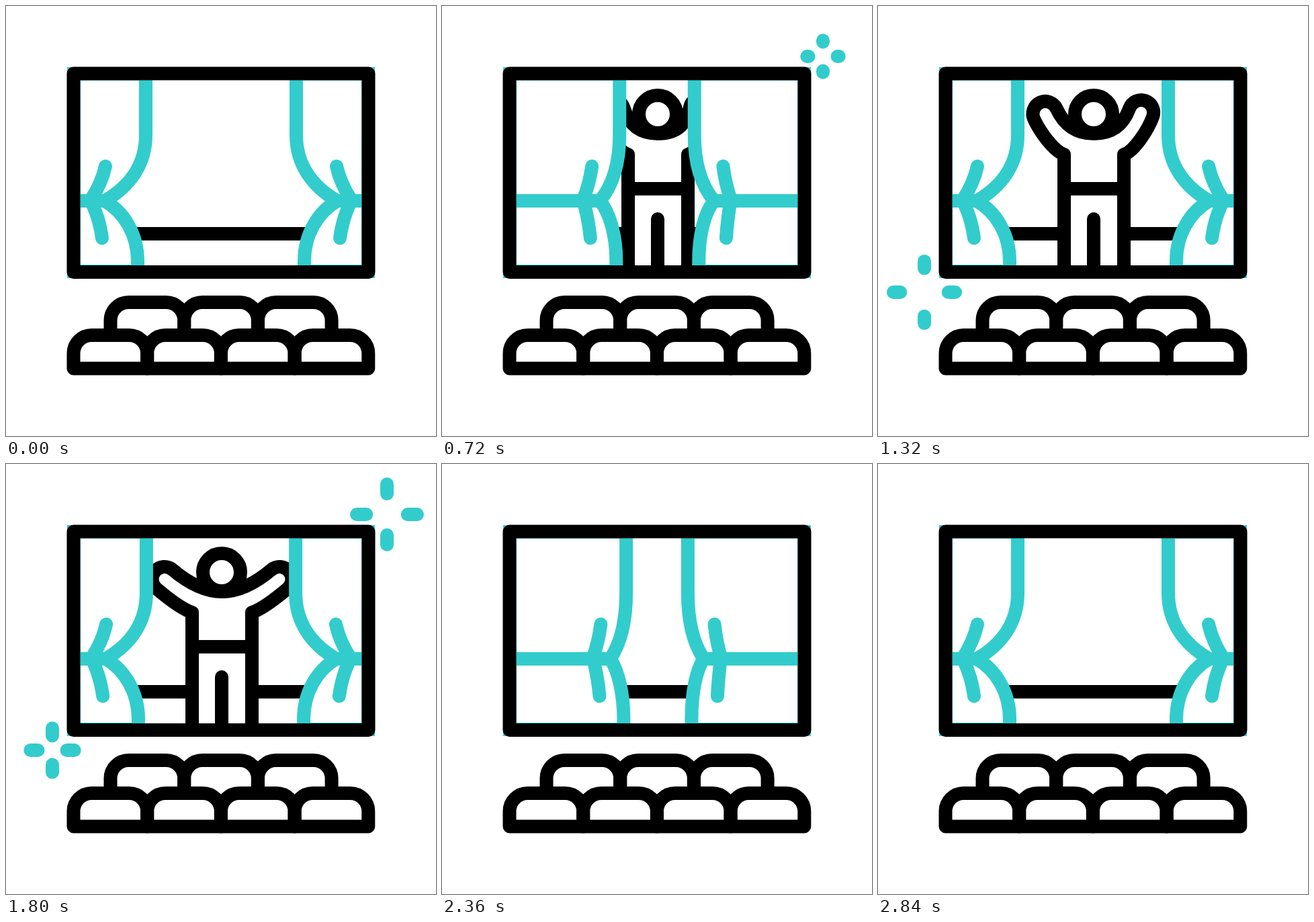
Recreate the animation shown at these times as an HTML page with a canvas. Size 640 px wide and 640 px high, loop 3 s.

```html
<!DOCTYPE html>
<html lang="en">
<head>
<meta charset="utf-8">
<title>Theatre</title>
<style>
  html, body { margin: 0; width: 100%; height: 100%; overflow: hidden; background: #fff; }
  canvas { display: block; }
</style>
</head>
<body>
<canvas id="stage" width="640" height="640"></canvas>
<script>
const ctx = document.getElementById('stage').getContext('2d');
const BLACK = '#000', TEAL = '#33cccc', WHITE = '#fff';
const LOOP = 3000, STEP = 40, LAST = 2840;

const clamp = u => Math.min(1, Math.max(0, u));
const progress = (t, from, to) => clamp((t - from) / (to - from));
const smooth = u => u * u * (3 - 2 * u);
const mix = (a, b, u) => a + (b - a) * u;

function draw(path, color, { fill, cap = 'butt', join = 'round' } = {}) {
  const shape = new Path2D(path);
  if (fill) {
    ctx.fillStyle = fill;
    ctx.fill(shape);
  }
  ctx.lineWidth = 20;
  ctx.lineCap = cap;
  ctx.lineJoin = join;
  ctx.strokeStyle = color;
  ctx.stroke(shape);
}

function mirrored(axis, paint) {
  ctx.save();
  ctx.translate(2 * axis, 0);
  ctx.scale(-1, 1);
  paint();
  ctx.restore();
}

// 0 = curtains drawn aside, 1 = closed
function closedAmount(t) {
  const opening = start => 1 - smooth(progress(t, start, start + 620) ** 0.75);
  if (t < 490) return smooth(progress(t, 20, 440));
  if (t < 1780) return opening(490);
  if (t < 2170) return smooth(progress(t, 1780, 2150));
  return opening(2170);
}

function curtain(p, hemShift, tieTopShift, tieLowShift) {
  const top = 208 + 104.8 * p, knot = 147 + 164 * p, hem = 196 + hemShift * p;
  const tie = 126 + 156 * p, tieTop = 148 + tieTopShift * p, tieLow = 143 + tieLowShift * p;
  draw(`M101 101 H${top} V192
        C${top} 236 ${184 + 128 * p} 268.6 ${knot} 290
        C${176 + 136 * p} 307 ${hem} 340 ${hem} 380 V395 H101 Z`,
       TEAL, { fill: WHITE, join: 'miter' });
  draw(`M101 290 H${knot}`, TEAL);
  const bend = (end, k) => mix(end, tie, k);
  draw(`M${tieTop} 238.5 C${bend(tieTop, .2)} 258 ${bend(tieTop, .55)} 274 ${tie} 289
        M${tieLow} 345.5 C${bend(tieLow, .2)} 322 ${bend(tieLow, .5)} 308 ${tie + 1} 291`,
       TEAL, { cap: 'round' });
}

function arm(raise) {
  const x = mix(236, 253, raise), y = mix(171.5, 157, raise);
  const angle = mix(40, 73, raise) * Math.PI / 180;
  const dx = Math.cos(angle), dy = Math.sin(angle), r = 18.5;
  const outer = [x - r * dy, y + r * dx], inner = [x + r * dy, y - r * dx];
  const along = ([px, py], k) => `${px + k * dx} ${py + k * dy}`;
  draw(`M277 272 V221 C262 216 ${along(outer, 22)} ${along(outer, 0)}
        A${r} ${r} 0 0 1 ${along(inner, 0)}
        C${along(inner, 26)} 293 190 321.5 190`, BLACK);
}

function performer(t) {
  const raise = .5 + .5 * Math.cos((t - 700) / 740 * 2 * Math.PI);
  arm(raise);
  mirrored(321.5, () => arm(raise * 1.18));
  draw('M277 272 H366 V396 H277 Z', BLACK, { fill: WHITE });
  draw('M321 317 V396', BLACK, { cap: 'round' });
  draw('M293 161 a28 28 0 1 1 56 0 a28 28 0 1 1 -56 0 Z', BLACK, { fill: WHITE });
}

function seats(left, count, top, bottom, closing) {
  for (let i = 0; i < count; i++) {
    draw(`M${left + i * 109.7} ${bottom} V${top + 27} a27 27 0 0 1 27 -27
          h55.7 a27 27 0 0 1 27 27 V${bottom} ${closing}`, BLACK);
  }
}

function sparkle(x, y, age) {
  const end = 1 - (1 - progress(age, 0, 590)) ** 2;
  const start = smooth(progress(age, 250, 540));
  if (age <= 0 || start >= end) return;
  for (let i = 0; i < 4; i++) {
    ctx.save();
    ctx.translate(x, y);
    ctx.rotate(i * Math.PI / 2);
    draw(`M${21.5 + 27.5 * start} 0 H${21.5 + 27.5 * end}`, TEAL, { cap: 'round' });
    ctx.restore();
  }
}

function render(t) {
  ctx.fillStyle = WHITE;
  ctx.fillRect(0, 0, 640, 640);

  draw('M101 339 H539', BLACK);
  if (t >= 480 && t < 2170) performer(t);
  const p = closedAmount(t);
  curtain(p, 118, 140, 145);
  mirrored(320, () => curtain(p, 115, 137, 138));
  draw('M100.5 100.5 H539.5 V396 H100.5 Z', BLACK);

  seats(155.5, 3, 441, 490, '');
  seats(100.5, 4, 490, 539.5, 'Z');

  for (const delay of [0, 742]) {
    sparkle(567, 75, t - 695 - delay);
    sparkle(69, 426, t - 922 - delay);
  }
}

const began = performance.now();
function tick() {
  const t = (performance.now() - began) % LOOP;
  render(Math.min(LAST, Math.floor(t / STEP) * STEP));
  requestAnimationFrame(tick);
}
tick();
</script>
</body>
</html>
```
